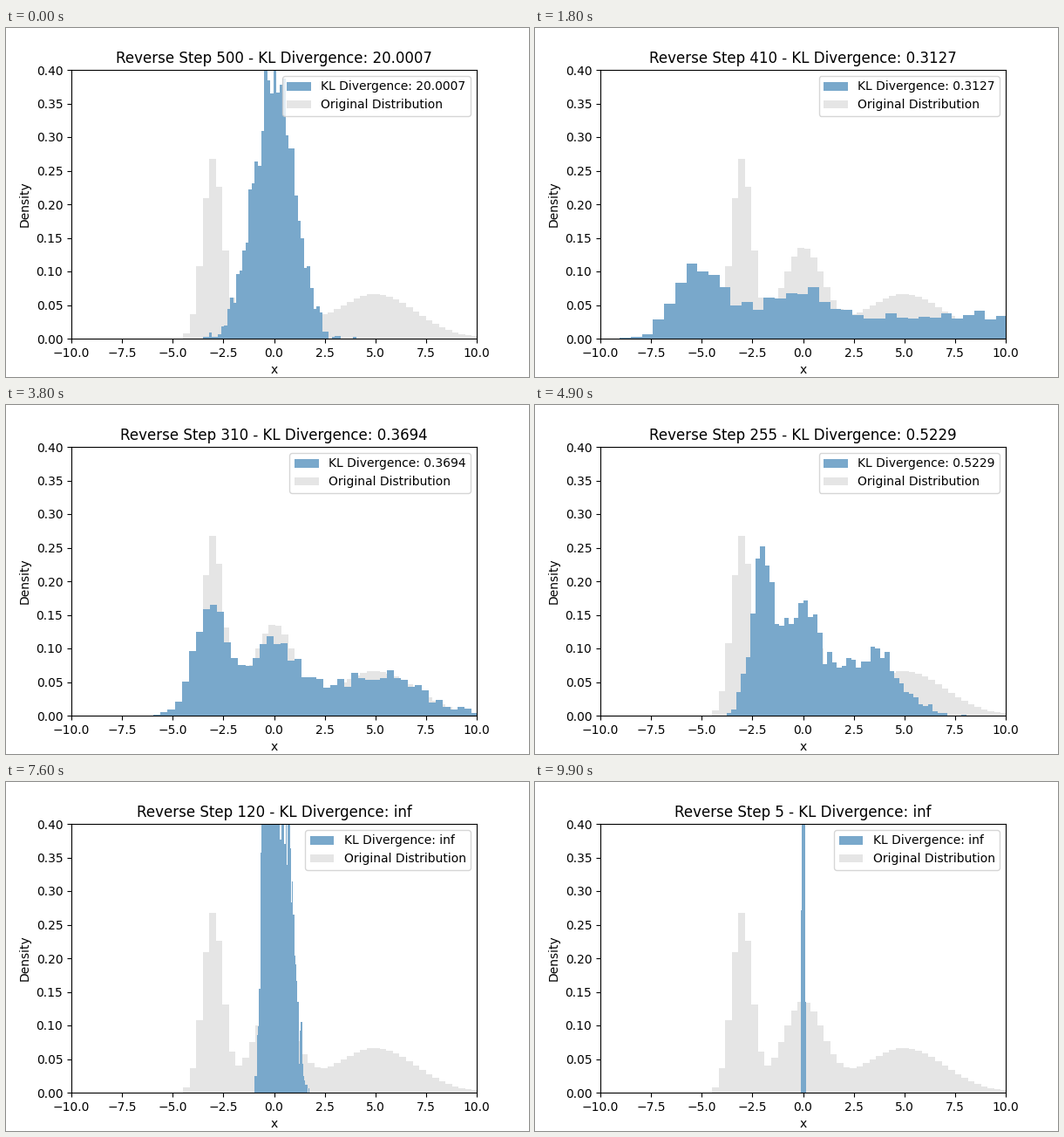
A matplotlib script that plays this animation: 600x400 px, repeating every 10 s.

```python
import numpy as np
import matplotlib.pyplot as plt
from matplotlib.animation import FuncAnimation

STEPS, STRIDE, BINS = 500, 5, 50
PER_MODE = 1000
MODES = ((-3, 0.5), (0, 1), (5, 2))  # mean and deviation, equal weights
LOW, HIGH = -4.48, 11.69
BLUE, GREY = "#79a8cb", "#e5e5e5"

# Key points of the divergence: infinite below the first one
KL_STEPS = [185, 255, 365, 455, 500]
KL_VALUES = [18.3514, 0.5229, 0.2610, 0.3746, 20.0007]

rng = np.random.default_rng(7)
data = np.concatenate([rng.normal(mean, sd, PER_MODE) for mean, sd in MODES])
data = data.clip(LOW, HIGH)
noise_a, noise_b = rng.normal(size=(2, data.size))


def mixture(x):
    return sum(np.exp(-((x - mean) / sd) ** 2 / 2) / sd
               for mean, sd in MODES) / (len(MODES) * np.sqrt(2 * np.pi))


def samples(step):
    """Noise opens into the three modes, then everything shrinks to zero."""
    u = STEPS - step
    rise = 1 - np.exp(-u / 28)
    collapse = 1 - np.exp(-step / 8)
    signal = 2 * rise * np.exp(-1.85e-5 * u**2)
    spread = (1 + 0.1 * rise) * np.exp(-1.3e-5 * u**2)
    turn = u / 60
    noise = np.cos(turn) * noise_a + np.sin(turn) * noise_b
    return collapse * (signal * data + spread * noise)


def divergence(step):
    return np.exp(np.interp(step, KL_STEPS, np.log(KL_VALUES), left=np.inf))


fig, ax = plt.subplots(figsize=(6, 4), dpi=100)
edges = np.linspace(LOW, HIGH, BINS + 1)
base = ax.stairs(mixture((edges[:-1] + edges[1:]) / 2), edges, fill=True,
                 color=GREY, label="Original Distribution")
bars = ax.stairs(np.zeros(BINS), edges, fill=True, color=BLUE,
                 label="KL Divergence")
ax.set(xlim=(-10, 10), ylim=(0, 0.4), xlabel="x", ylabel="Density")
title = ax.set_title("")
legend = ax.legend(handles=[bars, base], loc="upper right")


def update(i):
    step = STEPS - STRIDE * i
    bars.set_data(*np.histogram(samples(step), bins=BINS, density=True))
    label = f"KL Divergence: {divergence(step):.4f}"
    title.set_text(f"Reverse Step {step} - {label}")
    legend.get_texts()[0].set_text(label)
    return bars, title, legend


anim = FuncAnimation(fig, update, frames=STEPS // STRIDE, interval=100,
                     init_func=lambda: update(0), repeat=True, blit=False)
plt.show()
```
